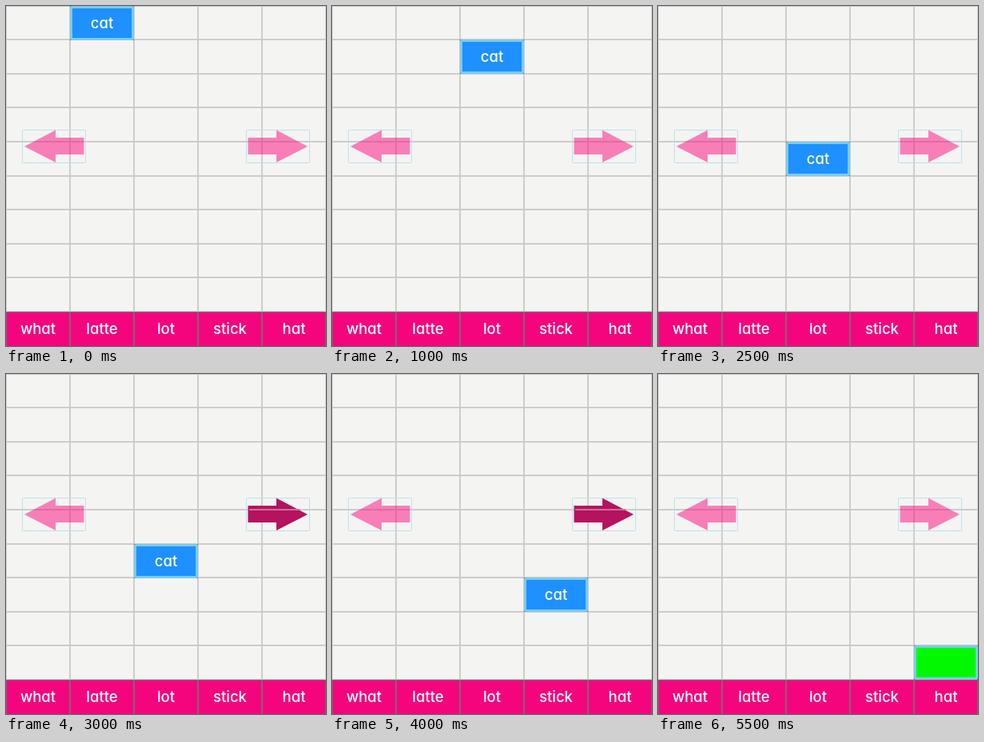
Write an HTML page that moves like this. It is 400x426 px and loops after 6 s.

```html
<!DOCTYPE html>
<html lang="en">
<head>
<meta charset="utf-8">
<title>Falling word</title>
<style>
  html, body { margin: 0; width: 100%; height: 100%; overflow: hidden; background: #f4f5f2; }
  svg { display: block; width: 400px; height: 426px; }
  text {
    font: 500 18.5px Inter, Lato, sans-serif;
    font-feature-settings: "cv11" 1;
    fill: #fff;
    text-anchor: middle;
  }
</style>
</head>
<body>
<svg id="stage" viewBox="0 0 400 426" xmlns="http://www.w3.org/2000/svg"></svg>
<script>
const NS = "http://www.w3.org/2000/svg";
const stage = document.getElementById("stage");
const COL = 80, LOOP = 6000, STEP = 500;
const rowY = r => Math.floor(r * 42.6);

function add(tag, attrs, parent = stage) {
  const el = document.createElementNS(NS, tag);
  for (const k in attrs) el.setAttribute(k, attrs[k]);
  parent.appendChild(el);
  return el;
}
function rect(x, y, width, height, fill, parent) {
  return add("rect", { x, y, width, height, fill }, parent);
}
function label(str, x, y, parent) {
  const el = add("text", { x, y }, parent);
  el.textContent = str;
  return el;
}

// Grid: neighbouring one-pixel borders make two-pixel lines
rect(0, 0, 400, 426, "#f4f5f2");
for (let c = 0; c <= 5; c++) rect(c * COL - 1, 0, 2, 383, "#cccdca");
for (let r = 0; r <= 9; r++) rect(0, rowY(r) - 1, 400, 2, "#cccdca");

// Answer row
rect(0, 383, 400, 43, "#f5057d");
rect(0, 383, 400, 1, "#8a6278");
for (let c = 0; c <= 5; c++) rect(c * COL - 1, 383, 2, 43, "#80647a");
["what", "latte", "lot", "stick", "hat"].forEach((w, c) => label(w, c * COL + 40, 411));

// Arrow buttons
function arrow(x, flip) {
  add("rect", { x: x + 0.5, y: 155.5, width: 79, height: 41, rx: 1, fill: "none", stroke: "#bcdfee" });
  const g = add("g", { transform: flip ? `translate(${x + 80} 0) scale(-1 1)` : `translate(${x} 0)` });
  return add("path", {
    d: "M3 176L42 155.5V165H77.5V186H42V196Z",
    fill: "#fd087f", "fill-opacity": 0.5
  }, g);
}
arrow(20, false);
const right = arrow(300, true);
const glint = rect(304, 169, 63, 2, "#c9709b");

// Moving cell
const cell = add("g", {});
rect(0, 0, 80, 43, "#7ccbeb", cell);
for (const x of [0, 79]) for (const y of [0, 42]) rect(x, y, 1, 1, "#35576b", cell);
const face = rect(3, 3, 74, 37, "#1e90ff", cell);
const word = label("cat", 40, 28, cell);

// Column, row and whether the right button is pressed
const moves = [
  [1, 0, 0], [1, 1, 1], [2, 1, 0], [2, 2, 0], [2, 3, 0], [2, 4, 0],
  [2, 5, 1], [3, 5, 0], [3, 6, 1], [4, 6, 0], [4, 7, 0], [4, 8, 0]
];

function draw(time) {
  const [col, row, pressed] = moves[Math.floor((time % LOOP) / STEP)];
  const landed = row === 8;
  cell.setAttribute("transform", `translate(${col * COL} ${rowY(row)})`);
  face.setAttribute("fill", landed ? "#00f900" : "#1e90ff");
  word.setAttribute("visibility", landed ? "hidden" : "visible");
  right.setAttribute("fill", pressed ? "#b5125f" : "#fd087f");
  right.setAttribute("fill-opacity", pressed ? 1 : 0.5);
  glint.setAttribute("visibility", pressed ? "visible" : "hidden");
}

const start = performance.now();
function tick() {
  draw(performance.now() - start);
  requestAnimationFrame(tick);
}
tick();
</script>
</body>
</html>
```
